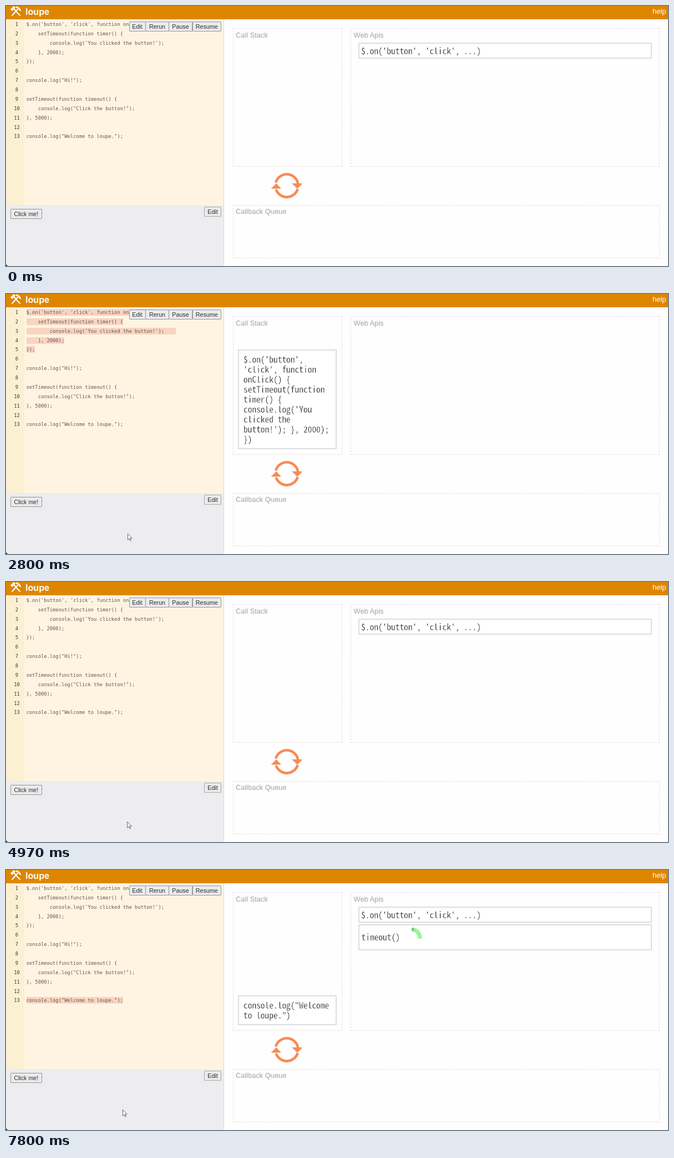
These frames come from a looping animation (1193 px wide and 469 px high, 8 s). An HTML page:

```html
<!DOCTYPE html>
<html lang="en">
<meta charset="utf-8">
<title>Event loop</title>
<style>
html, body { margin: 0; width: 100%; height: 100%; overflow: hidden; }
body { position: relative; background: #fefefe; font: 12.85px/16px "Liberation Sans", Arial, sans-serif; }
div, pre, svg { position: absolute; box-sizing: border-box; margin: 0; white-space: pre; }
.code { font: 8.79px/16.87px "DejaVu Sans Mono", monospace; color: #5f5a53; top: 24.9px; }
.code span { padding: 1px 0; }
.code .lit { background: #f9d4c1; }
.button { border: 1px solid #959595; border-radius: 1px; background: #ebebed; color: #2c2c2c;
  font-size: 10.7px; line-height: 16px; text-align: center; }
.panel { border: 1.5px dashed #dedede; color: #a2a2a2; padding: 4px 0 0 4.5px; }
/* The white text stroke thins the letters */
.item { border: 2px solid #dedede; background: #fff; color: #222; -webkit-text-stroke: .3px #fff;
  font: 300 15.42px/18px "Noto Sans Mono CJK KR", "Noto Sans Mono CJK JP", "Liberation Mono", monospace;
  font-size-adjust: ch-width 0.5; }
</style>
<body>
<script>
const LOOP = 8000, TICK = 66.3;

const source = `$.on('button', 'click', function onClick() {
    setTimeout(function timer() {
        console.log('You clicked the button!');    
    }, 2000);
});

console.log("Hi!");

setTimeout(function timeout() {
    console.log("Click the button!");
}, 5000);

console.log("Welcome to loupe.");`.split('\n');

// Each call: first and last highlighted line, start, fully shown, end, stack text
const calls = [
  [0, 4, 2730, 2800, 3260, `$.on('button',
'click', function
onClick() {
setTimeout(function
timer() {
console.log('You
clicked the
button!'); }, 2000);
})`],
  [6, 6, 4120, 4250, 4970, 'console.log("Hi!")'],
  [8, 10, 5630, 5760, 6550, `setTimeout(function
timeout() {
console.log("Click
the button!"); },
5000)`],
  [12, 12, 7210, 7470, LOOP, `console.log("Welcome
to loupe.")`],
];

// Pointer path: time, x, y
const path = [
  [1000, 1116, 1], [1350, 560, 30], [1500, 92, 50], [1770, 229, 55], [1910, 273, 55],
  [2050, 272, 52], [2320, 270, 39], [2520, 268, 44], [2760, 219, 432],
  [4900, 219, 432], [4960, 211, 432], [5090, 210, 432], [LOOP, 210, 432],
];

function box(x, y, w, h, text = '', className = '', style = '') {
  const el = document.createElement('div');
  el.className = className;
  el.style.cssText = `left:${x}px;top:${y}px;width:${w}px;height:${h}px;${style}`;
  el.textContent = text;
  document.body.append(el);
  return el;
}

function drawing(markup) {
  document.body.insertAdjacentHTML('beforeend',
    `<svg width="1193" height="469" style="left:0;top:0">${markup}</svg>`);
  return document.body.lastElementChild;
}

// Editor
box(0, 24, 392, 335, '', '', 'background:#fff4e2');
box(0, 24, 33, 335, '', '', 'background:#fbf0d2');
box(0, 359, 392, 110, '', '', 'background:#ededef');
box(392, 24, 1, 445, '', '', 'background:#d9d9d9');
box(0, 0, 39, 220, source.map((_, i) => i + 1).join('\n'), 'code', 'top:24.9px;text-align:center;color:#3c3830');
const code = box(36.5, 0, 355, 224, '', 'code', 'top:24.9px;overflow:hidden');
const lines = source.map(text => {
  const span = document.createElement('span');
  span.textContent = text;
  code.append(span, '\n');
  return span;
});

[['Edit', 221.5, 30], ['Rerun', 251, 43], ['Pause', 293, 43], ['Resume', 335.5, 52.5]]
  .forEach(([label, x, w]) => box(x, 28, w, 18, label, 'button'));
box(8, 366, 56.5, 18, 'Click me!', 'button');
box(357, 362, 31, 18, 'Edit', 'button', 'border-color:#a8a8a8');

// Header
box(0, 0, 1193, 24, '', '', 'background:#de8600');
box(35, 2, 60, 16, 'loupe', '', 'color:#fff;font-weight:bold;font-size:16.1px');
box(1165, 2, 28, 16, 'help', '', 'color:#fff;font-size:13px');

// Panels
box(408.5, 40, 197.5, 250, 'Call Stack', 'panel');
box(621, 40, 557, 250, 'Web Apis', 'panel');
box(408.5, 359, 769.5, 95.5, 'Callback Queue', 'panel', 'padding-top:3px');

const listener = box(635, 66, 529, 29, "$.on('button', 'click', ...)", 'item', 'padding:3px 0 0 3px');
const timer = box(635, 98, 529, 47, 'timeout()', 'item', 'padding:11px 0 0 3.5px');
const stack = calls.map(call => {
  const height = 18 * call[5].split('\n').length + 18;
  return box(418, 280 - height, 178, height, call[5], 'item', 'padding:6.3px 0 0 8px');
});

// Header icon, loop icon and rounded window corner
drawing(`
  <g stroke="#fff" stroke-width="2.2" fill="none">
    <path d="M10.5 17.5 22 5M25.5 17.5 13 4"/>
    <path d="M17.5 2Q24 2 26 9" stroke-width="2.6"/>
    <path d="M9.5 7.5 15.5 1.5" stroke-width="4"/>
  </g>
  <g fill="none" stroke="#f58b55" stroke-width="4.6">
    <path d="M486.2 318.5A20.6 20.6 0 0 1 526.3 320.5M486.6 331A20.6 20.6 0 0 0 525.7 330"/>
  </g>
  <path fill="#f58b55" d="M515 320H534.5L525 329.5ZM477.5 329.5H496L487 320Z"/>
  <path d="M0 465Q.5 468.5 4 469H0Z"/>`);

const spinner = drawing(`
  <circle cx="729" cy="121" r="13" fill="#fff"/>
  <path fill="none" stroke="#98f996" stroke-width="7.5"/>
  <path fill="#8fb588" d="M731 104.5h4.5v5h-4.5z"/>`);
const arc = spinner.querySelector('path');
const pointer = drawing(`<path d="M.5 .5V11.5L3.1 9.1 4.9 13 6.5 12.3 4.8 8.5H8Z"
  fill="#fff" stroke="#555" stroke-width=".9"/>`).firstElementChild;

const show = (el, on) => { el.style.visibility = on ? 'visible' : 'hidden'; };

function movePointer(t) {
  show(pointer, t >= 1000);
  if (t < 1000) return;
  const now = Math.max(1000, Math.floor(t / TICK) * TICK);
  const i = path.findIndex(point => point[0] > now);
  const [t0, x0, y0] = path[i - 1], [t1, x1, y1] = path[i];
  const k = (now - t0) / (t1 - t0);
  pointer.setAttribute('transform', `translate(${x0 + (x1 - x0) * k} ${y0 + (y1 - y0) * k})`);
}

function drawSpinner(t) {
  show(spinner, t >= 6550);
  const now = [7800, 7470, 7210, 7010, 6750, 6550].find(step => step <= t) || 6550;
  const angle = (now - 6440) * 0.072 * Math.PI / 180, r = 14.2;
  arc.setAttribute('d', `M731.5 ${121.7 - r}A${r} ${r} 0 0 1 ` +
    `${731.5 + r * Math.sin(angle)} ${121.7 - r * Math.cos(angle)}`);
}

function frame() {
  const t = performance.now() % LOOP;

  lines.forEach((line, i) => line.classList.toggle('lit',
    calls.some(([a, b, start, , end]) => i >= a && i <= b && t >= start && t < end)));
  calls.forEach(([, , start, full, end], i) => {
    show(stack[i], t >= start && t < end);
    stack[i].style.opacity = t < full ? 0.4 : 1;
  });

  show(listener, t < 2590 || t >= 3260);
  listener.style.background = t < 3260 || t >= 3520 ? '#fff' : t < 3390 ? '#fdffec' : '#fefff6';
  show(timer, t >= 6550);
  timer.style.background = t < 6750 ? '#fdffec' : '#fff';

  drawSpinner(t);
  movePointer(t);
  requestAnimationFrame(frame);
}
frame();
</script>
</body>
</html>
```
